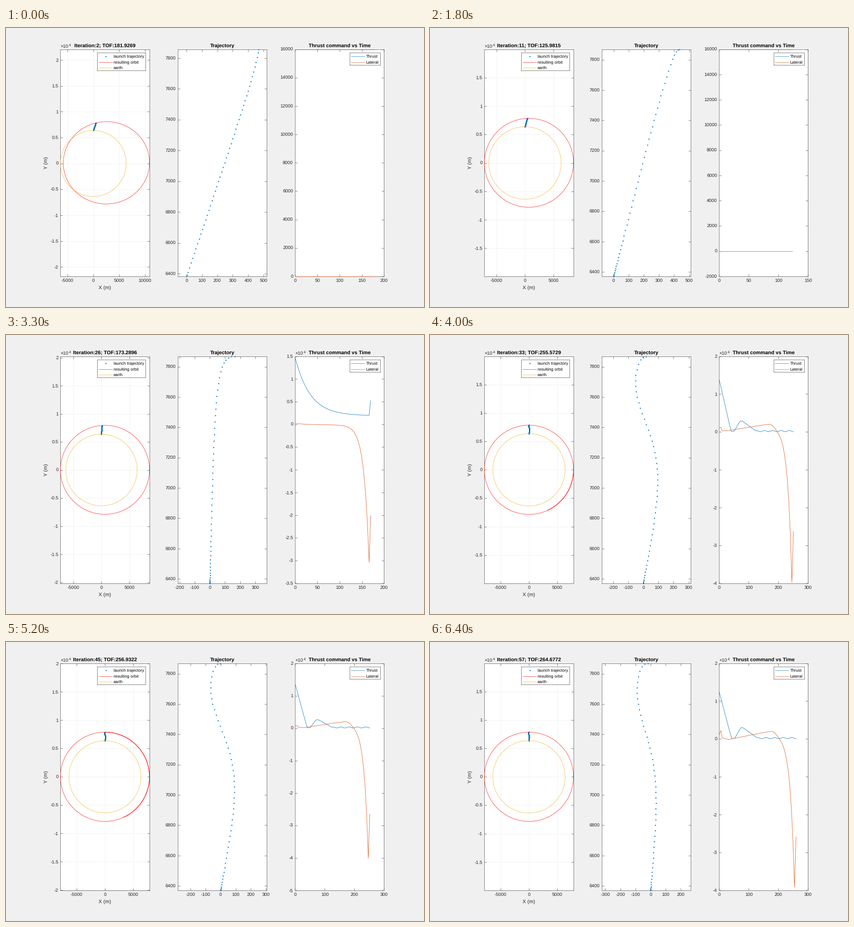
A matplotlib script for the animation above (8400 ms loop, 917 by 611 pixels).

```python
import numpy as np
import matplotlib.pyplot as plt
from matplotlib.animation import FuncAnimation

W, H = 917, 611
BLUE, ORANGE, GOLD, INK = "#0072BD", "#D95319", "#EDB120", "#262626"
TICK, TITLE, SMALL = 10.19, 11.2, 9.17
EARTH, TARGET = 6371, 7869
N = 50
IDX = np.arange(N)
U = IDX / (N - 1)
ANGLE = np.linspace(0, 360, 361)

plt.rcParams.update({"font.family": "Liberation Sans", "text.hinting": "none"})

# Pixel boxes of the three panels: left, top, right, bottom
WIDE = [(119.4, 46.6, 314.8, 543.8), (377.2, 46.6, 572.4, 543.8),
        (634.4, 46.6, 829.4, 543.8)]
TIGHT = [(119.4, 47.9, 313.4, 542.3), (377.2, 48.4, 571.2, 542.3),
         (634.4, 46.6, 828.3, 543.8)]

# Iterations at which the solver state is known; blends in between
KEYS = [2, 11, 19, 26, 33, 45, 56]


def at(it, *vals):
    return np.interp(it, KEYS, vals)


def blend(curves, it):
    weights = [at(it, *row) for row in np.eye(len(KEYS))]
    return np.tensordot(weights, curves, 1)


def tof(it):
    return at(it, 181.9269, 125.9815, 124.3802, 173.2896,
              255.5729, 256.9322, 264.6772)


def ellipse(a, cx, cy, deg):
    """Ellipse with one focus at the origin."""
    c = np.hypot(cx, cy)
    phi = np.arctan2(cy, cx)
    th = np.radians(deg) - phi
    u, v = a * np.cos(th), np.sqrt(a * a - c * c) * np.sin(th)
    return (cx + u * np.cos(phi) - v * np.sin(phi),
            cy + u * np.sin(phi) + v * np.cos(phi))


def climb(rise, fall):
    """Height fraction for a trapezoidal speed profile."""
    u = np.linspace(0, 1, 10 * (N - 1) + 1)
    v = np.minimum(1, np.minimum(u / rise, (1 - u) / fall))
    h = np.cumsum(v) - v[0]
    return h[::10] / h[-1]


def flight_path(it):
    """Steady lean, a swing back, and a final turn along the orbit."""
    h = climb(at(it, 0.05, 0.4, 0.55, 0.4, 0.25, 0.25, 0.25),
              at(it, 0.01, 0.1, 0.15, 0.15, 0.06, 0.06, 0.06))
    lean = at(it, 495, 385, 180, 35, 290, 285, 130)
    turn = at(it, -28, 50, 110, 131, 137, 131, 140)
    swing = at(it, 0, 0, 0, 0, 440, 450, 310)
    x = (lean * h + turn * np.exp((U - 1) / 0.1)
         - swing / (1 + np.exp((0.74 - U) / 0.1)))
    lift = np.interp(it, [2, 11], [12, 0])
    return x, EARTH + lift + (TARGET - EARTH - 2 * lift) * h


def late_thrust(start, peak):
    """Burn-out, a second burn, then a small ripple."""
    base = np.interp(U, [0, 0.16, 0.2, 0.28, 0.31, 0.51, 1],
                     [start, 150, 80, peak, peak, 50, 50])
    return base + 350 * np.sin(9 * np.pi * U)**2 * (U > 0.51)


def dive(base, depth, rate):
    """Exponential plunge that rebounds on the last sample."""
    d = depth * np.exp((IDX - N + 2) / rate)
    d[-1] = 0.66 * depth
    return base - d


def late_lateral(start, kick, low, depth):
    base = np.interp(U, [0, 0.02, 0.04, 0.12, 0.7, 0.8, 0.9],
                     [start, kick, 300, low, 2200, 800, 0])
    return dive(base, depth, 2.6)


full = np.full(N, 16000.0)
burn = np.interp(U, [0, 0.12, 0.65, 0.78, 0.94, 0.98, 1],
                 [16000, 15950, 8700, 8100, 8050, 9280, 13580])
decay = 1900 + 12800 * np.exp(-U / 0.2) + 3260 * (U == 1)
THRUST = [full, full, burn, decay, late_thrust(13900, 2900),
          late_thrust(13600, 2600), late_thrust(12500, 2980)]
LATERAL = [0 * full, 0 * full - 20, dive(-800 * U, 7200, 3.3),
           dive(250 * np.exp(-U / 0.1) - 200 * U, 30200, 3.3),
           late_lateral(1000, 1300, 350, 39800),
           late_lateral(600, 900, 170, 40100),
           late_lateral(960, 2290, -150, 39200)]


def nice_step(span, most):
    steps = (m * 10**p for p in range(6) for m in (1, 2, 5))
    return next(s for s in steps if span / s <= most)


def set_axis(axis, lim, step, unit=1):
    first, last = np.ceil(lim[0] / step - 1e-6), np.floor(lim[1] / step + 1e-6)
    t = np.arange(first, last + 1) * step + 0.0
    axis.set_ticks(t, [f"{v / unit:g}" for v in t])
    axis.axes.set(**{axis.axis_name + "lim": lim})


def place(ax, left, top, right, bottom):
    ax.set_position([left / W, 1 - bottom / H, (right - left) / W, (bottom - top) / H])


def note(ax, text, anchor, offset, size, **kw):
    return ax.annotate(text, anchor, xycoords="axes fraction", xytext=offset,
                       textcoords="offset points", size=size,
                       annotation_clip=False, **kw)


def make_panel(title):
    ax = fig.add_axes([0, 0, 1, 1])
    ax.set_axisbelow(True)
    ax.tick_params(direction="in", top=True, right=True, length=5, width=0.6,
                   color=INK, labelcolor=INK, labelsize=TICK)
    ax.tick_params(axis="x", pad=6.2)
    ax.tick_params(axis="y", pad=4.6)
    for s in ax.spines.values():
        s.set(linewidth=0.6, color=INK)
    ax.heading = note(ax, title, (0.5, 1), (0, 4), TITLE, weight="bold", ha="center")
    return ax


def exponent(ax):
    return [note(ax, "×10", (0, 1), (0, 2.2), TICK, color=INK),
            note(ax, "4", (0, 1), (18.2, 6.4), 8, color=INK)]


def make_key(w, h, rows, x0, x1, xt):
    ax = fig.add_axes([0, 0, 1, 1], xlim=(0, w), ylim=(h, 0), xticks=[], yticks=[])
    for s in ax.spines.values():
        s.set(linewidth=0.6, color=INK)
    for i, (name, color, dot) in enumerate(rows):
        y = 7.7 + 12.4 * i
        if dot:
            ax.plot([(x0 + x1) / 2], [y], "o", ms=2.5, mew=0, color=color)
        else:
            ax.plot([x0, x1], [y, y], color=color, lw=0.65)
        ax.text(xt, y + 3.3, name, size=SMALL, color="k")
    ax.size = w, h
    return ax


fig = plt.figure(figsize=(W / 72, H / 72), dpi=72, facecolor="#f0f0f0")
orbit_ax = make_panel("")
path_ax = make_panel("Trajectory")
cmd_ax = make_panel("Thrust command vs Time")
panels = [orbit_ax, path_ax, cmd_ax]

orbit_ax.grid(True, color=INK, alpha=0.08, lw=0.76)
note(orbit_ax, "X (m)", (0.5, 0), (0, -29.3), TITLE, color=INK, ha="center")
note(orbit_ax, "Y (m)", (0, 0.5), (-31, 0), TITLE, color=INK,
     rotation=90, ha="center", va="center")
exponent(orbit_ax)
cmd_exp = exponent(cmd_ax)

orbit_key = make_key(106, 39, [("launch trajectory", BLUE, True),
                               ("resulting orbit", "red", False),
                               ("earth", GOLD, False)], 4, 33, 35.6)
cmd_key = make_key(67.5, 26.5, [("Thrust", BLUE, False),
                                ("Lateral", ORANGE, False)], 3.5, 33.5, 36)

free = dict(clip_on=False, zorder=3)
flight, = orbit_ax.plot([], [], "o", ms=2.5, mew=0, color=BLUE, snap=False, **free)
orbit, = orbit_ax.plot([], [], color="red", lw=0.68, **free)
heavy, = orbit_ax.plot([], [], color="red", lw=1.1, **free)
orbit_ax.plot(*ellipse(EARTH, 0, 0, ANGLE), color=GOLD, lw=0.68, **free)
dots, = path_ax.plot([], [], "o", ms=2.5, mew=0, color=BLUE, snap=False, **free)
thrust, = cmd_ax.plot([], [], color=BLUE, lw=0.8, **free)
lateral, = cmd_ax.plot([], [], color=ORANGE, lw=0.8, **free)


def draw_orbit(it, x, y, ratio):
    cx = at(it, 2531, 702, 2010, 630, 4, 8, 2)
    shape = at(it, 8350, 7843, 8210, 7945, 7857, 7887, 7850), cx, 0.05 * cx
    ox, oy = ellipse(*shape, ANGLE)
    orbit.set_data(ox, oy)
    # The overlap of repeated revolutions shows as a heavier arc
    heavy.set_data(*ellipse(*shape, np.linspace(-65, min(90, 8 * it - 269), 90)))
    heavy.set_visible(30 <= it <= 50)
    flight.set_data(x, y)
    lo, hi = min(ox.min(), -EARTH), max(ox.max(), EARTH)
    mid, half = (oy.min() + oy.max()) / 2, (hi - lo) / 2 * ratio
    set_axis(orbit_ax.xaxis, (lo, hi), 5000)
    set_axis(orbit_ax.yaxis, (mid - half, mid + half), 5000, 1e4)


def draw_path(x, y, ratio):
    dots.set_data(x, y)
    mid, half = (x.min() + x.max()) / 2, np.ptp(y) / 2 / ratio
    set_axis(path_ax.xaxis, (mid - half, mid + half), 100)
    set_axis(path_ax.yaxis, (y.min(), y.max()), 200)


def draw_command(it):
    t = 0.98 * tof(it) * U
    up, side = blend(THRUST, it), blend(LATERAL, it)
    thrust.set_data(t, up)
    lateral.set_data(t, side)
    lo, hi = min(up.min(), side.min()), max(up.max(), side.max())
    step = nice_step(hi - lo, 10)
    lim = np.floor(lo / step + 1e-9) * step, np.ceil(hi / step - 1e-9) * step
    big = step >= 5000
    set_axis(cmd_ax.yaxis, lim, step, 1e4 if big else 1)
    for part in cmd_exp:
        part.set_visible(big)
    step = nice_step(t[-1], 5)
    set_axis(cmd_ax.xaxis, (0, np.ceil(t[-1] / step) * step), step)


def update(frame):
    it = 2 if frame < 10 else min(frame - 7, 57)
    boxes = TIGHT if 16 <= it <= 19 else WIDE
    for ax, box in zip(panels, boxes):
        place(ax, *box)
    for ax, (_, top, right, _) in ((orbit_key, boxes[0]), (cmd_key, boxes[2])):
        w, h = ax.size
        place(ax, right - 8.4 - w, top + 7.8, right - 8.4, top + 7.8 + h)

    ratios = [(b - t) / (r - l) for l, t, r, b in boxes]
    x, y = flight_path(it)
    orbit_ax.heading.set_text(f"Iteration:{it}; TOF:{tof(it):.4f}")
    draw_orbit(it, x, y, ratios[0])
    draw_path(x, y, ratios[1])
    draw_command(it)


anim = FuncAnimation(fig, update, frames=84, interval=100, repeat=True,
                     repeat_delay=0, blit=False)
plt.show()
```
